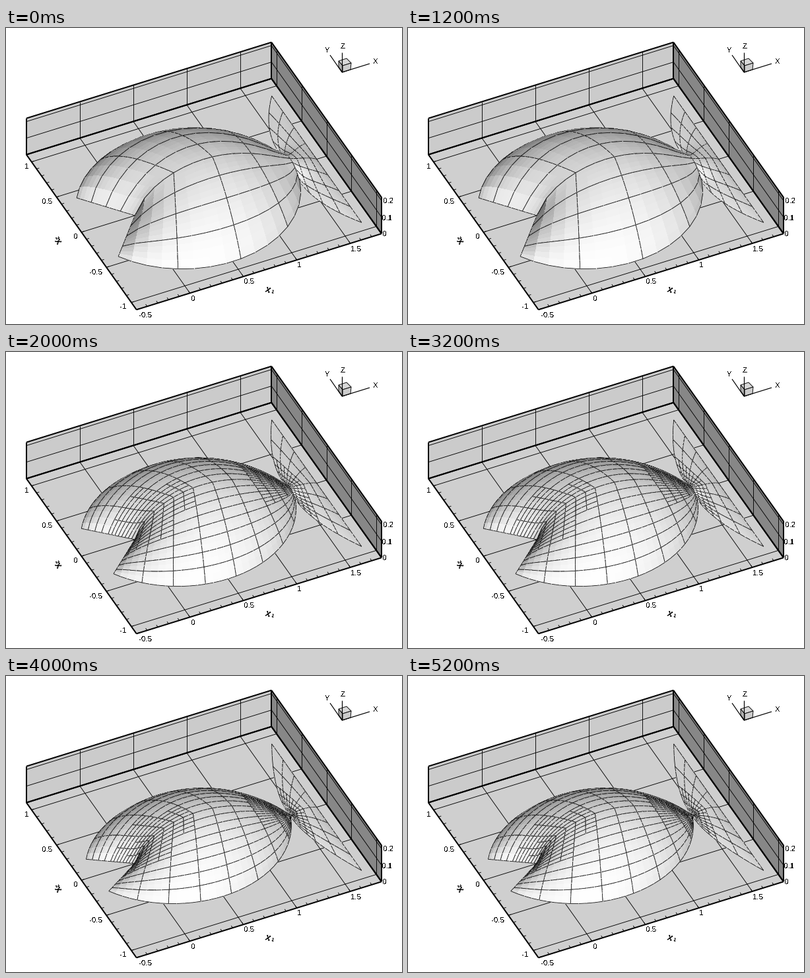
A matplotlib script for the animation above (6 s loop, 600 by 448 pixels).

```python
import numpy as np
import matplotlib.pyplot as plt
from matplotlib.animation import FuncAnimation
from matplotlib.collections import PolyCollection

W, H, DPI = 600, 448, 100
PX = 72 / DPI  # one pixel in points
THIN = 0.9

plt.rcParams.update({
    "font.family": "Liberation Sans",
    "text.antialiased": False,
})

fig = plt.figure(figsize=(W / DPI, H / DPI), dpi=DPI, facecolor="white")
ax = fig.add_axes([0, 0, 1, 1])
ax.set_xlim(0, W)
ax.set_ylim(H, 0)
ax.axis("off")

X0, X1, Y0, Y1, Z1 = -0.5, 1.792, -1.103, 1.103, 0.22


def project(x, y, z=0.0):
    """Parallel projection of model space to stage pixels."""
    return np.stack([195.3 + 162 * x - 75.6 * y + 0 * z,
                     283.9 - 50.2 * x - 106.4 * y - 250 * z], axis=-1)


def line(a, b, width=THIN):
    (xa, ya), (xb, yb) = a, b
    ax.plot([xa, xb], [ya, yb], color="black", lw=width * PX,
            solid_capstyle="butt")


def line3(a, b, width=THIN):
    line(project(*a), project(*b), width)


def face(points, color, edge="none"):
    ax.add_patch(plt.Polygon(points, facecolor=color, edgecolor=edge,
                             lw=THIN * PX, zorder=1))


def label(x, y, text, size=11.5, **kw):
    ax.text(x, y, text, fontsize=size * PX, ha="center", va="center", **kw)


# ---------------------------------------------------------------- box

def draw_box():
    floor = [(X0, Y1, 0), (X1, Y1, 0), (X1, Y0, 0), (X0, Y0, 0)]
    back = [(X0, Y1, 0), (X1, Y1, 0), (X1, Y1, Z1), (X0, Y1, Z1)]
    side = [(X1, Y1, 0), (X1, Y0, 0), (X1, Y0, Z1), (X1, Y1, Z1)]
    for corners, color in ((floor, "#cfcfcf"), (back, "#cbcbcb"),
                           (side, "#878787")):
        face([project(*p) for p in corners], color)

    for x in (0, 0.5, 1, 1.5):
        line3((x, Y0, 0), (x, Y1, 0))
        line3((x, Y1, 0), (x, Y1, Z1))
    for y in (-1, -0.5, 0, 0.5, 1):
        line3((X0, y, 0), (X1, y, 0))
        line3((X1, y, 0), (X1, y, Z1))
    for z in (0.1, 0.2):
        line3((X0, Y1, z), (X1, Y1, z))
        line3((X1, Y1, z), (X1, Y0, z))

    for x in np.arange(-0.4, X1, 0.1):
        line3((x, Y0, 0), (x, Y0 + 0.03, 0))
    for y in np.arange(-1.1, Y1, 0.1):
        line3((X0, y, 0), (X0 + 0.025, y, 0))

    for corners in (floor, back, side):
        for a, b in zip(corners, corners[1:] + corners[:1]):
            line3(a, b, 2)


def draw_labels():
    for x, y, text in ((211, 435, "-0.5"), (284, 410, "0"), (369, 384, "0.5"),
                       (444, 359, "1"), (530, 335, "1.5"),
                       (31, 210, "1"), (63, 263, "0.5"), (106, 316, "0"),
                       (136, 370, "-0.5"), (178, 422, "-1"),
                       (574, 312, "0"), (578, 288, "0.1"), (579, 262, "0.2")):
        label(x, y, text)
    label(397, 396, "x", 14, rotation=-17, weight="bold")
    label(404, 400, "1", 8, rotation=-17, weight="bold")
    label(78, 323, "x", 14, rotation=-55, weight="bold")
    label(76, 318, "2", 8, rotation=-55, weight="bold")


def draw_compass():
    face([(504, 50), (516, 46), (523, 53), (510, 57)], "#d8d8d8", "black")
    face([(504, 50), (510, 57), (510, 67), (504, 59)], "#b0b0b0", "black")
    face([(510, 57), (523, 53), (522, 63), (510, 67)], "#cccccc", "black")
    for tip in ((509, 37), (551, 54), (491, 41)):
        line((509, 67), tip, 1.2)
    label(510, 28, "Z")
    label(560, 51, "X")
    label(487, 34, "Y")


# ------------------------------------------------------------ surface

A0, A1 = np.arccos(-0.85), np.arccos(0.95)
NECK = 1.45


def rim(s, sink):
    """Upper edge of the domain: circular arc, then the flaring tail."""
    if s <= 1:
        a = A0 + (A1 - A0) * (s - 0.018 * np.sin(np.pi * s))
        return np.array([0.5 + np.cos(a), np.sin(a) - sink])
    q = s - 1
    y = np.sin(A1) - sink
    start, bend, end = np.array([[NECK, y], [1.44, y + 0.32], [1.7, 0.9]])
    return (1 - q) ** 2 * start + 2 * q * (1 - q) * bend + q * q * end


def axis_x(s):
    return NECK * s if s <= 1 else NECK + 0.25 * (s - 1)


def domain(ss, tt, sink):
    pts = np.empty((len(ss), len(tt), 2))
    for i, s in enumerate(ss):
        bx, by = rim(s, sink)
        cx = axis_x(s)
        pts[i, :, 0] = cx + (bx - cx) * np.abs(tt)
        pts[i, :, 1] = by * tt
    return pts


def solve_height(pts):
    """Linear finite elements for -laplace(u) = 1 with u = 0 on the edge."""
    n, m = pts.shape[:2]
    ids = np.arange(n * m).reshape(n, m)
    p = pts.reshape(-1, 2)
    a, b = ids[:-1, :-1].ravel(), ids[1:, :-1].ravel()
    c, d = ids[1:, 1:].ravel(), ids[:-1, 1:].ravel()
    tri = np.concatenate([np.stack([a, b, c], 1), np.stack([a, c, d], 1)])
    q = p[tri]
    edge = np.roll(q, -2, axis=1) - np.roll(q, -1, axis=1)
    e0, e1 = edge[:, 0], edge[:, 1]
    area2 = np.abs(e0[:, 0] * e1[:, 1] - e0[:, 1] * e1[:, 0]) + 1e-12
    local = np.einsum("kia,kja->kij", edge, edge) / (2 * area2)[:, None, None]
    stiff = np.zeros((n * m, n * m))
    load = np.zeros(n * m)
    np.add.at(stiff, (tri[:, :, None], tri[:, None, :]), local)
    np.add.at(load, tri, np.repeat(area2[:, None] / 6, 3, axis=1))
    inner = ids[1:-1, 1:-1].ravel()
    u = np.zeros(n * m)
    u[inner] = np.linalg.solve(stiff[np.ix_(inner, inner)], load[inner])
    return np.clip(u, 0, None).reshape(n, m)


def on_step(v, step):
    return abs(v / step - round(v / step)) < 1e-6


def s_line(s, t, blocks):
    """Is the cross line at s drawn around |t|?"""
    return any(a - 1e-9 <= s <= b + 1e-9 and c < t < d and on_step(s, ds)
               for a, b, c, d, ds, dt in blocks)


def t_line(s, t, blocks):
    """Is the lengthwise line at |t| drawn around s?"""
    return any(a < s < b and c - 1e-9 <= t <= d + 1e-9 and on_step(t, dt)
               for a, b, c, d, ds, dt in blocks)


LIGHT = np.array([-0.17, -0.55, 0.815])
RELIEF = 1.25


def shade(quad):
    n = np.cross(quad[2] - quad[0], quad[3] - quad[1])
    n = n * np.array([RELIEF, RELIEF, 1.0])
    n /= np.linalg.norm(n) + 1e-12
    if n[2] < 0:
        n = -n
    g = np.clip(n @ LIGHT, 0.36, 1.0)
    return (g, g, g, 1.0)


def build(sink, top, cells, blocks):
    """Facets and mesh lines, ordered from far to near."""
    half = 16
    ss = np.concatenate([np.linspace(0, 1, cells + 1),
                         np.linspace(1, 2, 17)[1:]])
    tt = np.linspace(-1, 1, 2 * half + 1)
    flat = domain(ss, tt, sink)
    u = solve_height(flat)
    z = top * (u / u.max()) ** 0.9
    xyz = np.dstack([flat, z])
    scr = project(xyz[..., 0], xyz[..., 1], xyz[..., 2])

    facets = []
    for i in range(len(ss) - 1):
        sm = (ss[i] + ss[i + 1]) / 2
        for j in range(len(tt) - 1):
            tm = abs(tt[j] + tt[j + 1]) / 2
            corners = [(i, j), (i + 1, j), (i + 1, j + 1), (i, j + 1)]
            quad = np.array([xyz[k] for k in corners])
            p = [scr[k] for k in corners]
            marks = (t_line(sm, abs(tt[j]), blocks),
                     s_line(ss[i + 1], tm, blocks),
                     t_line(sm, abs(tt[j + 1]), blocks),
                     s_line(ss[i], tm, blocks))
            edges = [(p[k], p[(k + 1) % 4]) for k in range(4) if marks[k]]
            far = quad[:, :2].mean(axis=0) @ (50.2, 106.4)
            facets.append((far, p, shade(quad), edges))
    facets.sort(key=lambda f: -f[0])

    clear, black = (0, 0, 0, 0), (0, 0, 0, 1)
    verts, fills, strokes, widths, smooth = [], [], [], [], []
    for _, poly, color, edges in facets:
        verts.append(np.array(poly))
        fills.append(color)
        strokes.append(clear)
        widths.append(0)
        smooth.append(False)
        for e in edges:
            verts.append(np.array(e))
            fills.append(clear)
            strokes.append(black)
            widths.append(0.8 * PX)
            smooth.append(True)
    return verts, fills, strokes, widths, smooth


E, S = 1 / 8, 1 / 16
# mesh blocks: s from, s to, |t| from, |t| to, s step, t step
COARSE = [(0, 2, 0, 1, 0.25, 0.25)]
MEDIUM = COARSE + [
    (0, 1, 0, 1, E, E),
    (0, 0.25, 0, 0.5, S, S), (0.25, 0.375, 0, 0.25, S, S),
    (0.75, 1, 0, 0.5, S, S),
    (1, 1.5, 0, 1, E, E),
]
FINE = COARSE + [
    (0, 1, 0, 1, E, E),
    (0, 0.25, 0, 0.5, S, S), (0.25, 0.375, 0, 0.25, S, S),
    (0, E, 0, 0.25, S / 2, S),
    (0.75, 1, 0, 0.5, E, S), (0.875, 1, 0, 1, S, S),
    (1, 1.5, 0, 1, E, E), (1, 1.25, 0, 0.5, E, S),
]

draw_box()
draw_labels()
draw_compass()

stages = [build(0.11, 0.212, 16, COARSE),
          build(0.205, 0.205, 32, MEDIUM),
          build(0.30, 0.195, 32, FINE)]

surface = PolyCollection([], zorder=3)
ax.add_collection(surface, autolim=False)


def update(k):
    verts, fills, strokes, widths, smooth = stages[k]
    surface.set_verts(verts)
    surface.set_facecolor(fills)
    surface.set_edgecolor(strokes)
    surface.set_linewidth(widths)
    surface.set_antialiased(smooth)
    return [surface]


anim = FuncAnimation(fig, update, frames=len(stages), interval=2000,
                     repeat=True, repeat_delay=0, blit=False)
plt.show()
```
